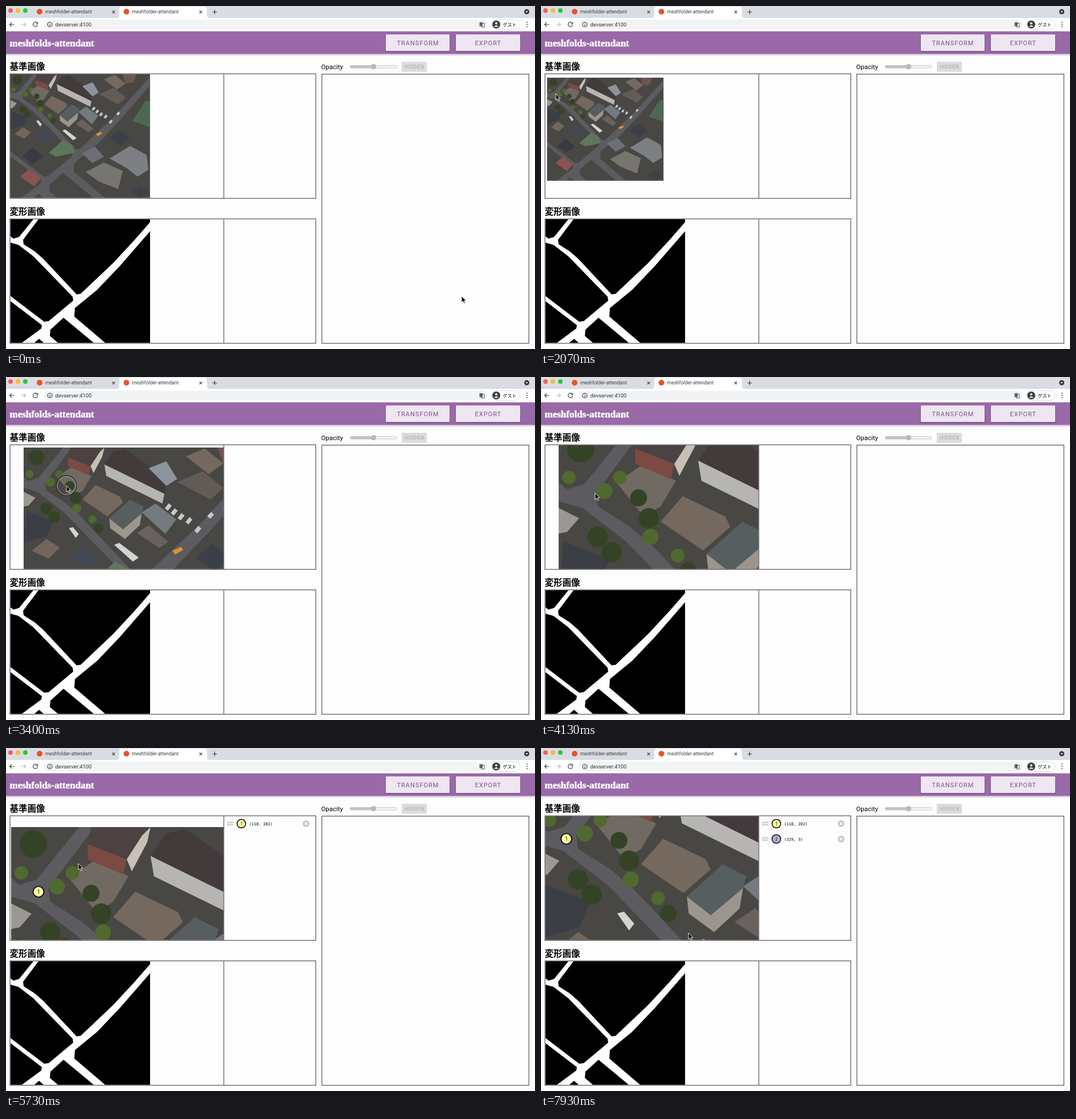
An HTML page for the animation above (8 s loop, 929x603 px).

```html
<!DOCTYPE html>
<html lang="ja">
<head>
<meta charset="utf-8">
<title>Image alignment</title>
<style>
  html, body { margin: 0; width: 100%; height: 100%; overflow: hidden; background: #fdfdfd; }
  svg { display: block; width: 100%; height: 100%; }
  text { font-family: Roboto, sans-serif; }
  .tab { font-size: 8.5px; fill: #3c4043; }
  .brand { font: bold 17px "Liberation Serif", serif; fill: #fff; stroke: #fff; stroke-width: .5; }
  .heading { font: bold 15.5px "Noto Sans CJK JP", "Noto Sans CJK", sans-serif; }
  .button { font-size: 11px; letter-spacing: 1px; fill: #804f96; }
  .pane { fill: none; stroke: #77727b; stroke-width: 1.5; }
  .line { fill: none; stroke: #3c4043; stroke-width: 1.2; }
  .coords { font: 6.85px "DejaVu Sans Mono", monospace; }
  .number { font-family: Inter, sans-serif; text-anchor: middle; }
</style>
</head>
<body>
<svg viewBox="0 0 929 603" preserveAspectRatio="none">
  <defs>
    <clipPath id="viewport"><rect x="7.5" y="120" width="375" height="217.5"/></clipPath>
    <clipPath id="photoEdge"><rect width="246" height="218"/></clipPath>
    <linearGradient id="shadow" x2="0" y2="1">
      <stop stop-color="#8d7694" stop-opacity=".65"/><stop offset="1" stop-color="#8d7694" stop-opacity="0"/>
    </linearGradient>
    <!-- City blocks; the gaps between them are the roads -->
    <g id="blocks">
      <path d="M0 0H40L15 31 5 34 0 30Z"/>
      <path d="M49 0H245V5L218 36 180 77 142 113 123 131 116 132 57 69 42 56 23 44 22 36Z"/>
      <path d="M245 21V217H166L112 171 113 156 152 124 192 82Z"/>
      <path d="M0 41 14 45 40 65 109 136 110 143 67 179 59 180 0 135Z"/>
      <path d="M0 144 55 186 54 192 20 217H0Z"/>
      <path d="M93 173 146 217H83L69 205 70 194Z"/>
      <path d="M42 217 50 210 58 217Z"/>
    </g>
    <g id="closeX"><path d="M-2.3-2.3 2.3 2.3M2.3-2.3-2.3 2.3"/></g>
  </defs>
  <rect width="929" height="603" fill="#fdfdfd"/>

  <!-- Browser window -->
  <rect width="929" height="21" fill="#d9dde3"/>
  <path d="M194 21Q199 21 199 16V6Q199 1 204 1H348Q353 1 353 6V16Q353 21 358 21Z" fill="#fff"/>
  <rect y="21" width="929" height="24" fill="#fff"/>
  <circle cx="8" cy="8" r="4" fill="#fc5b57"/>
  <circle cx="21" cy="8" r="4" fill="#f5bc30"/>
  <circle cx="34" cy="8" r="4" fill="#2ac73f"/>
  <circle cx="59" cy="10" r="5" fill="#ee4f27"/>
  <circle cx="211.500" cy="10" r="5" fill="#ee4f27"/>
  <text class="tab" x="69" y="13">meshfolder-attendant</text>
  <text class="tab" x="221.500" y="13">meshfolder-attendant</text>
  <g class="line">
    <use href="#closeX" x="189" y="10.500"/>
    <use href="#closeX" x="342" y="10.500"/>
    <path d="M362.500 10.500H370.500M366.500 6.500V14.500M14.500 32.500H6.500M10 29 6.500 32.500 10 36"/>
    <path d="M26.500 32.500H34.500M31 29 34.500 32.500 31 36" stroke="#b9bbbe"/>
    <path d="M54.500 29.500A4 4 0 1 0 55.500 33.500M55.500 28V31.500H52"/>
  </g>
  <circle cx="914.500" cy="10" r="4.500" fill="#34373b"/>
  <path d="M912.300 9H916.700L914.500 11.700Z" fill="#fff"/>
  <rect x="66" y="24" width="780" height="17" rx="8.500" fill="#f1f3f4"/>
  <circle class="line" cx="77" cy="32.500" r="4"/>
  <path class="line" d="M77 32V35M77 30V31"/>
  <text x="86.500" y="36" font-size="9.400" fill="#303236">devserver:4100</text>
  <rect x="831.500" y="28.500" width="5.500" height="7" fill="#686b70"/>
  <rect class="line" x="835" y="30.500" width="5" height="6.500" style="stroke-width:.8"/>
  <rect x="852.500" y="24" width="50.500" height="17" rx="8.500" fill="#fff" stroke="#dadce0"/>
  <circle cx="861" cy="32.500" r="7" fill="#3c4043"/>
  <circle cx="861" cy="30.500" r="2" fill="#fff"/>
  <path d="M857 36.500Q861 31.500 865 36.500Z" fill="#fff"/>
  <text x="872.500" y="35.500" font-size="8" style="font-family:'Noto Sans CJK JP','Noto Sans CJK',sans-serif">ゲスト</text>
  <path d="M915 28.500V28.600M915 32.500V32.600M915 36.500V36.600" stroke="#3c4043" stroke-width="2" stroke-linecap="round"/>

  <!-- Page header and controls -->
  <rect y="83" width="929" height="5" fill="url(#shadow)"/>
  <rect y="44.500" width="929" height="39.500" fill="#9969a8"/>
  <text class="brand" x="6.500" y="71">meshfolds-attendant</text>
  <g fill="#5f366e" opacity=".35">
    <rect x="666" y="50" width="114" height="31" rx="2"/><rect x="789" y="50" width="115" height="31" rx="2"/>
  </g>
  <rect x="667" y="50" width="112" height="29" rx="1" fill="#eee6f0"/>
  <rect x="790" y="50" width="113" height="29" rx="1" fill="#eee6f0"/>
  <text class="button" x="686.500" y="68.700">TRANSFORM</text>
  <text class="button" x="823.500" y="68.700">EXPORT</text>
  <text class="heading" x="6.500" y="111.700">基準画像</text>
  <text class="heading" x="6.500" y="366.700">変形画像</text>
  <text x="553.500" y="110.700" font-size="11.400">Opacity</text>
  <rect x="604.500" y="104.500" width="81.500" height="4.500" rx="2.200" fill="#f5f5f5" stroke="#c9c9d0"/>
  <rect x="604" y="104.300" width="42" height="5" rx="2.500" fill="#c2c2c2"/>
  <circle cx="645.500" cy="106.700" r="4.800" fill="#b9b9b9"/>
  <rect x="695" y="98" width="44" height="17.500" fill="#dcdcdc"/>
  <text x="699.700" y="109.800" font-size="8.500" letter-spacing=".8" fill="#a8a8a8">HIDDEN</text>

  <g clip-path="url(#viewport)">
    <g id="photo"><g clip-path="url(#photoEdge)">
      <rect width="246" height="218" fill="#5c5b60"/>
      <use href="#blocks" fill="#484743"/>
      <path d="M34 30 50 19 69 29 60 44 50 50Z" fill="#706a62"/>
      <path d="M45 9 68 19 66 28 45 19Z" fill="#7b4a42"/>
      <path d="M47 0H84L68 19 45 10Z" fill="#4b4241"/>
      <path d="M82 0 80 9 71 26 68 19 77 5Z" fill="#c7c0b6"/>
      <path d="M82 17 143 47 141 57 84 29Z" fill="#b6b5b4"/>
      <path d="M82 17 91 4 102 1 128 19 146 36 143 47Z" fill="#423a3b"/>
      <path d="M127 21 145 14 156 32 145 39Z" fill="#8c939b"/>
      <path d="M60 53 73 38 98 50 101 56 85 70Z" fill="#75685e"/>
      <path d="M87 72 101 83 120 67 118 79 103 93 88 82Z" fill="#9c958d"/>
      <path d="M87 72 108 53 122 60 120 67 101 83Z" fill="#565e60"/>
      <path d="M120 66 134 57 155 73 144 88Z" fill="#757a7e"/>
      <path d="M115 87 127 79 147 96 138 102Z" fill="#68615e"/>
      <path d="M156 35 182 24 203 41 190 53Z" fill="#625b56"/>
      <path d="M165 9 184 1 203 16 188 27Z" fill="#75685f"/>
      <path d="M197 0H222L217 14 203 16Z" fill="#705550"/>
      <path d="M0 45 12 51 5 59 0 60Z" fill="#9b9893"/>
      <path d="M3 65 30 75 24 90 0 97Z" fill="#3b3e45"/>
      <path d="M8 105 23 93 37 102 25 113Z" fill="#74655c"/>
      <path d="M46 108 63 99 78 113 63 122Z" fill="#414853"/>
      <path d="M22 145 39 129 59 145 40 158Z" fill="#373a40"/>
      <path d="M68 138 93 116 110 125 113 138 81 145Z" fill="#5c775c"/>
      <path d="M215 82 238 47H246V93Z" fill="#4b6952"/>
      <path d="M175 112 192 98 211 112 194 126Z" fill="#3b3f48"/>
      <path d="M126 139 149 127 165 145 145 156Z" fill="#6c7076"/>
      <path d="M175 148 211 126 240 142 243 168 224 180 205 165Z" fill="#7c7f83"/>
      <path d="M133 172 165 155 198 170 190 202 155 188Z" fill="#777570"/>
      <path d="M18 180 33 167 55 183 42 197Z" fill="#8b5352"/>
      <path d="M210 207 228 196 244 208 230 218Z" fill="#3d4149"/>
      <g fill="#344326">
        <circle cx="23" cy="62" r="6"/><circle cx="31" cy="71" r="6"/><circle cx="47" cy="39" r="5"/>
        <circle cx="53" cy="51" r="6"/><circle cx="13" cy="10" r="8"/><circle cx="76" cy="82" r="5"/>
      </g>
      <g fill="#50692e">
        <circle cx="27" cy="35" r="4.700"/><circle cx="6" cy="27" r="4"/><circle cx="54" cy="62" r="4.700"/>
        <circle cx="36" cy="27" r="4"/><circle cx="70" cy="73" r="4"/>
      </g>
      <path d="M46 82 50 81 56 88 53 92ZM92 99 97 97 117 112 111 116Z" fill="#d2d3d2"/>
      <path d="M151 105 160 101 162 104 154 109Z" fill="#db922e"/>
      <path d="M145 63 149 58M151 68 155 63M158 73 162 68M166 77 170 72M175 86 179 81M188 71 192 67" stroke="#c5c8cc" stroke-width="4"/>
    </g></g>
    <g id="pins"></g>
  </g>
  <g transform="translate(8 375)"><rect width="245" height="217" fill="#fff"/><use href="#blocks"/></g>

  <path class="pane" d="M7 119.200H544V338.300H7ZM382.500 119V338M7 374.200H544V593H7ZM382.500 374V593M554.700 119.700H918.300V593H554.700Z"/>
  <g id="rows"></g>
  <g id="ring" fill="none">
    <circle r="17.500" stroke="#222" stroke-width="1.400"/><circle r="16.300" stroke="#ddd" stroke-width=".7"/>
  </g>
  <path id="cursor" d="M0 0V11.300L2.600 9 4.400 13 6.300 12.200 4.500 8.200H8Z" fill="#0b0b0b" stroke="#fff" stroke-width=".9"/>
</svg>
<script>
const LOOP = 8000;
const $ = id => document.getElementById(id);

// time, x, y of the pointer tip
const pointerTrack = [
  [0, 800, 510], [250, 800, 510], [1650, 26, 154], [2650, 26, 154],
  [3000, 69, 163], [3400, 106, 191], [3550, 133, 208.5], [3700, 95, 204],
  [4130, 95, 204], [4450, 79, 210], [4650, 79, 210], [4900, 149, 160],
  [5350, 127, 203], [5750, 127, 203], [6200, 142.5, 140], [6450, 142.5, 140],
  [7050, 178, 271], [7230, 178, 271], [7600, 165.5, 178], [7930, 259, 325]
];
// time, x, y, zoom of the photo; drags share their times with the pointer
const viewTrack = [
  [0, 7, 120, 1], [1800, 7, 120, 1], [1950, 10.5, 126, .833], [2250, 10.5, 126, .833],
  [2650, -6, 96, 1.728], [3000, -6, 96, 1.728], [3400, 31, 124, 1.728],
  [3550, 58, 141.5, 1.728], [3700, 58, 141.5, 1.728], [4100, 31, 96, 2.986],
  [4900, 31, 96, 2.986], [5350, 9, 139, 2.986], [7230, 9, 139, 2.986], [7600, -3.5, 46, 2.986]
];
const presses = [[3000, 3550], [4450, 4600], [4900, 5350], [6220, 6400], [7100, 7600]];
const pins = [
  { time: 4500, x: 16.1, y: 38.1, color: '#fcfba1', label: '(118, 282)' },
  { time: 6270, x: 44.7, y: .4, color: '#b9b1d9', label: '(329, 3)' }
];

function sample(track, time) {
  const next = track.findIndex(key => key[0] > time);
  if (next < 0) return track.at(-1).slice(1);
  const a = track[next - 1], b = track[next];
  const p = (time - a[0]) / (b[0] - a[0]);
  const eased = p * p * (3 - 2 * p);
  return a.slice(1).map((value, i) => value + (b[i + 1] - value) * eased);
}

function addGroup(parent, markup) {
  const group = document.createElementNS('http://www.w3.org/2000/svg', 'g');
  group.innerHTML = markup;
  return $(parent).appendChild(group);
}

const badge = (number, color, r, size) =>
  `<circle r="${r}" fill="${color}" stroke="#0b0b0b" stroke-width="${r / 5}"/>
   <text class="number" y="${size * .36}" font-size="${size}">${number}</text>`;

pins.forEach((pin, i) => {
  pin.mark = addGroup('pins', badge(i + 1, pin.color, 9.4, 8.5));
  pin.row = addGroup('rows', `
    <path d="M388 -2H399.500M388 2H399.500" stroke="#cdcdcd" stroke-width="2.500"/>
    <g transform="translate(413.300)">${badge(i + 1, pin.color, 7.6, 7)}</g>
    <text class="coords" x="427" y="2.700">${pin.label}</text>
    <circle cx="527" r="6" fill="#c9c9c9"/>
    <use href="#closeX" x="527" stroke="#fff" stroke-width="1.500"/>`);
  pin.row.setAttribute('transform', `translate(0 ${133 + 27 * i})`);
});

const place = (node, x, y, scale = 1) =>
  node.setAttribute('transform', `translate(${x} ${y}) scale(${scale})`);
const show = (node, visible) => node.style.display = visible ? '' : 'none';

function render(time) {
  const [px, py] = sample(pointerTrack, time);
  const [vx, vy, zoom] = sample(viewTrack, time);
  place($('cursor'), px, py);
  place($('ring'), px, py);
  show($('ring'), presses.some(([from, to]) => time >= from && time < to));
  place($('photo'), vx, vy, zoom);
  for (const pin of pins) {
    place(pin.mark, vx + pin.x * zoom, vy + pin.y * zoom);
    show(pin.mark, time >= pin.time);
    show(pin.row, time >= pin.time);
  }
}

const start = performance.now();
function tick() {
  render((performance.now() - start) % LOOP);
  requestAnimationFrame(tick);
}
tick();
</script>
</body>
</html>
```
